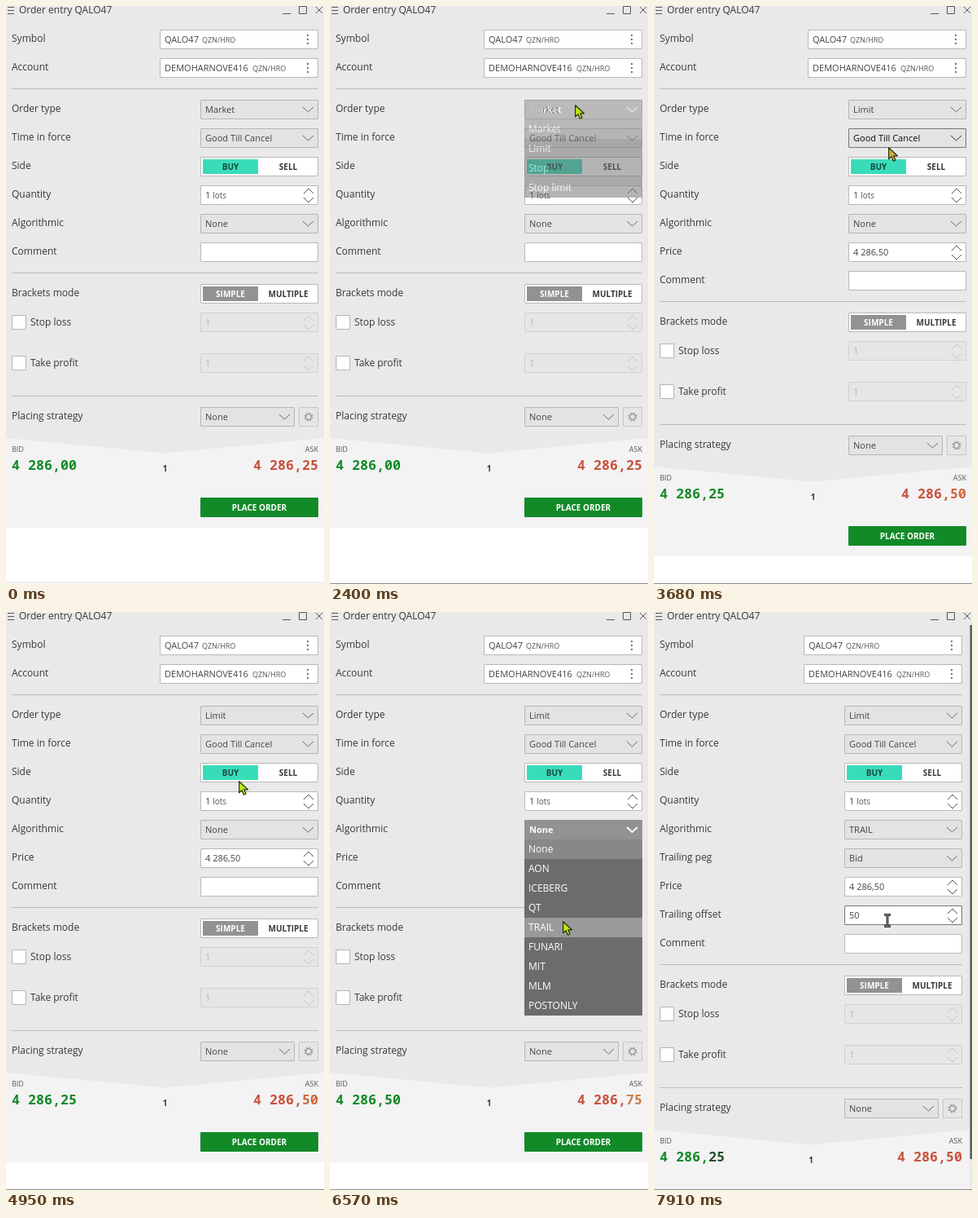
Animation of 391x709 px, one loop 8000 ms. Source, as an HTML page:

```html
<!DOCTYPE html>
<html lang="en">
<head>
<meta charset="utf-8">
<title>Order entry</title>
<style>
  html, body { margin: 0; width: 100%; height: 100%; overflow: hidden; background: #fff; }
  svg { display: block; width: 391px; height: 709px; }
  text { font: 12px "Open Sans", "Noto Sans", sans-serif; fill: #383838; }
  .val { font-size: 11px; fill: #444; }
  .hot { fill: #0c0c0c; }
  .off { fill: #b4b4b4; }
  .small { font-size: 9px; fill: #555; }
  .unit { font-size: 10px; fill: #555; }
  .btn { font-size: 10px; font-weight: 700; text-anchor: middle; }
  .head { font-size: 11px; font-weight: 700; fill: #fff; }
  .item { font-weight: 500; fill: #fff; }
  .price { font: 700 16.67px "Noto Sans Mono", "DejaVu Sans Mono", monospace; }
</style>
</head>
<body>
<svg id="stage" viewBox="0 0 391 709"></svg>
<script>
const LOOP = 8000;
const SYMBOL = 'QALO47', VENUE = 'QZN/HRO', ACCOUNT = 'DEMOHARNOVE416';
const TYPES = ['Market', 'Limit', 'Stop', 'Stop limit'];
const ALGOS = ['None', 'AON', 'ICEBERG', 'QT', 'TRAIL', 'FUNARI', 'MIT', 'MLM', 'POSTONLY'];
const GREEN = '#128a28', RED = '#c9523f', AMBER = '#d0673f';

// time, bid, ask, colour of the last two digits of each
const PRICES = [
  [0, '4 286,00', '4 286,25', GREEN, RED],
  [1090, '4 285,75', '4 286,00', GREEN, AMBER],
  [1800, '4 286,00', '4 286,25', GREEN, RED],
  [3380, '4 286,25', '4 286,50', GREEN, AMBER],
  [5050, '4 286,50', '4 286,75', GREEN, '#cd7f48'],
  [7910, '4 286,25', '4 286,50', '#20502c', RED]
];

// start, end, steps, from, to, easing
const smooth = p => p * p * (3 - 2 * p);
const MOVES = [
  [790, 1470, 10, [335, 696], [301, 121], smooth],
  [2730, 3010, 5, [301, 121], [288, 173], p => p ** 1.6],
  [4670, 5360, 10, [288, 173], [283, 271], smooth],
  [6100, 6570, 7, [283, 271], [286, 379], smooth]
];

const rect = (x, y, w, h, fill, more = '') =>
  `<rect x="${x}" y="${y}" width="${w}" height="${h}" fill="${fill}" ${more}/>`;
const box = (x, y, w, h, fill, edge) =>
  rect(x + .5, y + .5, w - 1, h - 1, fill, `stroke="${edge}" rx=".5"`);
const text = (x, y, s, cls = '', more = '') =>
  `<text x="${x}" y="${y}" class="${cls}" ${more}>${s}</text>`;
const line = (d, color, w = 1) =>
  `<path d="${d}" fill="none" stroke="${color}" stroke-width="${w}"/>`;
const rule = (y, R) => rect(7, y, R - 7, 1, '#bcbcbc');

function pointer(t) {
  if (t < 460) return null;
  let pos = MOVES[0][3];
  for (const [a, b, n, from, to, ease] of MOVES) {
    if (t < a) break;
    const k = Math.min(n - 1, Math.floor((t - a) / (b - a) * (n - 1) + .2));
    const p = ease((k + 1) / n);
    pos = from.map((v, i) => Math.round(v + (to[i] - v) * p));
  }
  return pos;
}

function arrow([x, y], fill) {
  return `<path transform="translate(${x} ${y})" fill="${fill}" stroke="#2b3010" stroke-width="1.2"
    stroke-linejoin="round" d="M.6 .8V14.8L4 11.8L6.4 17.2L9 16L6.7 10.8H11.4Z"/>`;
}

function beam(x, y) {
  const d = `M${x - 4} ${y - 7.5}H${x + 4}M${x - 4} ${y + 6.5}H${x + 4}M${x} ${y - 7}V${y + 6}`;
  return line(d, '#333', 3) + line(d, '#9a9a9a', .8);
}

const chevron = (r, y, color, w = 1) =>
  line(`M${r - 19} ${y + 9}l6.5 6l6.5 -6`, color, w);

function select(x, y, w, value, hot) {
  return box(x, y, w, 24, '#e3e3e3', hot ? '#777' : '#b6b6b6') +
    text(x + 6, y + 16, value, hot ? 'val hot' : 'val') +
    chevron(x + w, y, hot ? '#333' : '#666');
}

function input(x, y, value, hot, off) {
  const r = x + 145, c = off ? '#c4c4c4' : '#555';
  return box(x, y, 145, 24, off ? '#e6e6e6' : '#fff', off ? '#d0d0d0' : hot ? '#777' : '#b9b9b9') +
    text(x + 6, y + 16, value, off ? 'val off' : 'val') +
    line(`M${r - 18} ${y + 10}l6 -6l6 6M${r - 18} ${y + 15}l6 6l6 -6`, c);
}

function toggle(x, y, a, b, fill, ink) {
  return box(x, y, 145, 24, '#fff', '#b9b9b9') + rect(x + 3, y + 3, 68, 18, fill) +
    text(x + 37, y + 15.5, a, 'btn', `style="fill:${ink}"`) + text(x + 108, y + 15.5, b, 'btn');
}

function picker(R, y, value) {
  let s = box(R - 195, y, 195, 24, '#fff', '#b9b9b9') + text(R - 189, y + 16, value, 'val') +
    text(R - (value === SYMBOL ? 143 : 81), y + 16, VENUE, 'small');
  for (const d of [7, 12, 17]) s += `<circle cx="${R - 13}" cy="${y + d}" r="1.1" fill="#555"/>`;
  return s;
}

function dropdown(y, items, hover, opacity) {
  let s = rect(239, y, 145, 24, '#929292') + text(245, y + 16, items[0], 'head') +
    chevron(384, y, '#fff', 2);
  items.forEach((name, i) => {
    const top = y + 24 * (i + 1);
    s += rect(239, top, 145, 24, i === 0 ? '#888' : i === hover ? '#9a9a9a' : '#6c6c6c') +
      text(244, top + 16, name, 'item');
  });
  return `<g opacity="${opacity}">${s}</g>`;
}

function gear(x, y) {
  const c = `cx="${x + 12}" cy="${y + 12}" fill="none" stroke="#9a9a9a"`;
  return box(x, y, 24, 24, '#e6e6e6', '#c6c6c6') + `<circle ${c} r="3.3" stroke-width="1.3"/>` +
    `<circle ${c} r="4.7" stroke-width="1.6" stroke-dasharray="1.85"/>`;
}

function titleBar() {
  return line('M2 1.5H10M2 5.5H10M2 9.5H10', '#555') + text(16, 9, 'Order entry ' + SYMBOL) +
    line('M340 9.5H350M360.5 .5H369.5V9.5H360.5ZM381 1L389 9M389 1L381 9', '#555');
}

function quotes(t, y, R) {
  const [, bid, ask, bidEnd, askEnd] = PRICES.filter(p => p[0] <= t).pop();
  const quote = (x, s, color, end) => text(x, y + 39,
    `${s.slice(0, 6)}<tspan style="fill:${end}">${s.slice(6)}</tspan>`, 'price', `style="fill:${color}"`);
  const mid = R / 2 + 3.5, edge = R === 384 ? 391 : 388;
  return `<path d="M0 ${y}L${mid} ${y + 18.5}L${edge} ${y}V${y + 110}H0Z" fill="#f3f3f3"/>` +
    text(7, y + 17, 'BID', 'small') + text(R, y + 17, 'ASK', 'small', 'text-anchor="end"') +
    quote(7, bid, GREEN, bidEnd) + quote(R - 80, ask, RED, askEnd) +
    text(mid, y + 41, '1', 'btn') +
    rect(R - 145, y + 73, 145, 24, GREEN, 'rx="1"') +
    text(R - 72.5, y + 88.5, 'PLACE ORDER', 'btn', 'style="fill:#fff"');
}

function scene(t) {
  const mode = t < 3280 ? 0 : t < 6840 ? 1 : 2;
  const shift = [0, 35, 105][mode], R = mode === 2 ? 379 : 384, x = R - 145;
  const typeOpen = t >= 2350 && t < 3280, algoOpen = t >= 5490 && t < 6840;
  const open = typeOpen || algoOpen;
  const tip = pointer(t);
  const hot = y => !open && tip && tip[1] >= y && tip[1] < y + 24;
  const pick = name => y => select(x, y, 145, name, hot(y));
  const num = value => y => input(x, y, value, hot(y));

  const rows = [
    ['Order type', pick(mode ? 'Limit' : 'Market')],
    ['Time in force', pick('Good Till Cancel')],
    ['Side', y => toggle(x, y, 'BUY', 'SELL', '#39dcb9', '#17493f')],
    ['Quantity', num('1 <tspan class="unit">lots</tspan>')],
    ['Algorithmic', pick(mode === 2 ? 'TRAIL' : 'None')]
  ];
  if (mode === 2) rows.push(['Trailing peg', pick('Bid')]);
  if (mode) rows.push(['Price', num('4 286,50')]);
  if (mode === 2) rows.push(['Trailing offset', num('50')]);
  rows.push(['Comment', y => box(x, y, 145, 24, '#fff', hot(y) ? '#777' : '#b9b9b9')]);

  let s = rect(0, 0, 391, 709, '#fff') + rect(0, 0, 391, 640 + shift, '#e9e9e9') + titleBar() +
    text(7, 44, 'Symbol') + picker(R, 29, SYMBOL) +
    text(7, 79, 'Account') + picker(R, 64, ACCOUNT) + rule(101, R);

  rows.forEach(([label, draw], i) => {
    const y = 115 + 35 * i;
    s += text(7, y + 15, label) + draw(y);
  });

  const b = 341 + shift;
  s += rule(b - 14, R) + text(7, b + 15, 'Brackets mode') +
    toggle(x, b, 'SIMPLE', 'MULTIPLE', '#929292', '#fff');
  ['Stop loss', 'Take profit'].forEach((label, i) => {
    const y = b + 35 + 50 * i;
    s += box(7, y + 3, 18, 18, '#fff', '#b4b4b4') + text(30, y + 16, label) +
      input(x, y, '1', false, true);
  });
  s += rule(b + 137, R) + text(7, b + 166, 'Placing strategy') +
    select(x, b + 151, 116, 'None', hot(b + 151)) + gear(R - 24, b + 151) +
    quotes(t, b + 189, R);

  if (mode === 2) s += rect(388.5, 16, 2.5, 655, '#5c5c5c');
  s += t < 2350 ? rect(0, 707, 391, 1, '#e0e0e0') : rect(0, 708, 391, 1, '#8c8c8c');

  const hoverItem = top => tip ? Math.floor((tip[1] - top) / 24) : -1;
  if (typeOpen) s += dropdown(115, TYPES, hoverItem(139), t < 2420 ? .5 : t < 2490 ? .8 : 1);
  if (algoOpen) s += dropdown(255, ALGOS, hoverItem(279), t < 5560 ? .5 : 1);

  if (mode === 2) s += beam(287, 379);
  else if (tip) s += arrow(tip, t >= 3280 && t < 4670 ? '#cbae3a' : '#b6ea14');
  return s;
}

const stage = document.getElementById('stage');
const start = performance.now();
let last = '';

function tick() {
  const next = scene((performance.now() - start) % LOOP);
  if (next !== last) stage.innerHTML = last = next;
  requestAnimationFrame(tick);
}
tick();
</script>
</body>
</html>
```
